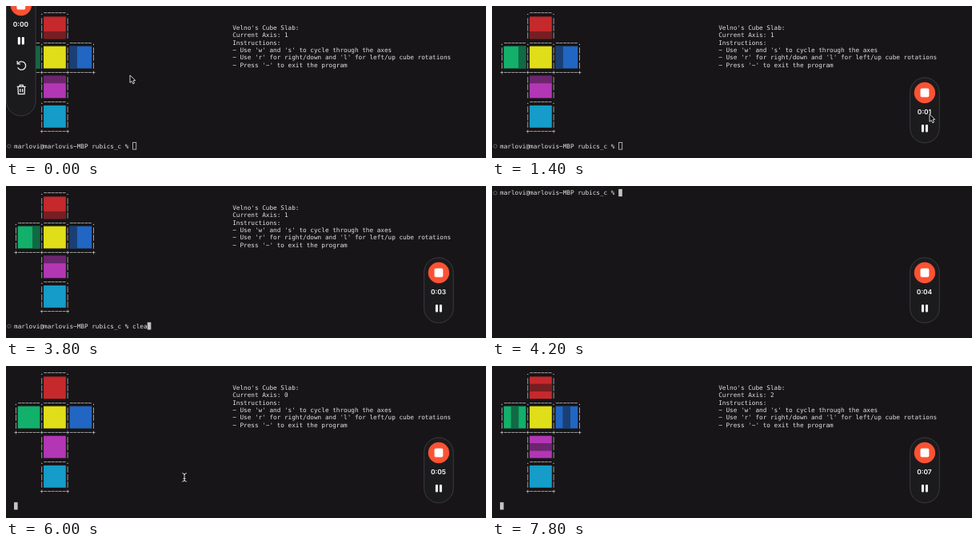
Recreate the animation shown at these times as an HTML page with a canvas. Size 600 px wide and 191 px high, loop 8 s.

```html
<!DOCTYPE html>
<html lang="en">
<head>
<meta charset="utf-8">
<title>Cube slab terminal</title>
<style>
  html, body { margin: 0; width: 100%; height: 100%; overflow: hidden; background: #171518; }
  canvas { display: block; width: 600px; height: 191px; }
</style>
</head>
<body>
<canvas id="stage"></canvas>
<script>
const W = 600, H = 191, LOOP = 8000, STEP = 200;
const CELL = 4.63, ROW = 9.3, LEFT = 10, TOP = 4.05;
const BG = '#171518', INK = '#e2e2e2';
const PROMPT = 'marlovi@marlovis-MBP rubics_c % ';

const canvas = document.getElementById('stage');
const ctx = canvas.getContext('2d');
const dpr = window.devicePixelRatio || 1;
canvas.width = W * dpr;
canvas.height = H * dpr;
ctx.scale(dpr, dpr);

const colX = c => LEFT + c * CELL;
const rowY = r => TOP + r * ROW;

// Piecewise-linear path through [time, x, y] points
function along(path, t) {
  if (t <= path[0][0]) return path[0].slice(1);
  for (let i = 1; i < path.length; i++) {
    const [t0, x0, y0] = path[i - 1], [t1, x1, y1] = path[i];
    if (t <= t1) {
      const k = (t - t0) / (t1 - t0);
      return [x0 + (x1 - x0) * k, y0 + (y1 - y0) * k];
    }
  }
  return path[path.length - 1].slice(1);
}

function print(text, col, row) {
  ctx.font = '7.69px "DejaVu Sans Mono", monospace';
  ctx.textRendering = 'geometricPrecision';
  ctx.textAlign = 'left';
  ctx.textBaseline = 'alphabetic';
  ctx.fillStyle = INK;
  // the terminal font has wide hyphens
  ctx.fillText(text.replace(/-/g, '\u2212'), colX(col), rowY(row) + 7.4);
}

function block(col, row, filled) {
  if (filled) {
    ctx.fillStyle = '#c4c4c4';
    ctx.fillRect(colX(col), rowY(row) - 0.2, CELL, ROW);
  } else {
    ctx.strokeStyle = '#b8b8b8';
    ctx.lineWidth = 0.9;
    ctx.strokeRect(colX(col) + 0.4, rowY(row), CELL - 0.5, ROW - 0.6);
  }
}

function prompt(row, typed, focused) {
  ctx.strokeStyle = '#6c6c6e';
  ctx.lineWidth = 0.8;
  ctx.beginPath();
  ctx.arc(4, rowY(row) + 4.7, 2.2, 0, 7);
  ctx.stroke();
  print(PROMPT + typed, 0, row);
  block(PROMPT.length + typed.length, row, focused);
}

// Fill cells with a colour; shaded cells get a half-tone texture
function cells(col, row, w, h, color, shaded) {
  const x = colX(col), y = rowY(row), pw = w * CELL, ph = h * ROW;
  ctx.fillStyle = BG;
  ctx.fillRect(x, y, pw, ph);
  ctx.fillStyle = color;
  ctx.globalAlpha = shaded ? 0.5 : 1;
  ctx.fillRect(x, y, pw, ph);
  if (shaded) {
    ctx.globalAlpha = 0.22;
    for (let j = 0; j < ph - 0.5; j++)
      for (let i = j % 2; i < pw - 0.5; i += 2) ctx.fillRect(x + i, y + j, 1, 1);
  }
  ctx.globalAlpha = 1;
}

function face(col, row, color, shadeRow, shadeCol) {
  cells(col, row, 6, 3, color, false);
  if (shadeRow >= 0) cells(col, row + shadeRow, 6, 1, color, true);
  if (shadeCol >= 0) cells(col + 2 * shadeCol, row, 2, 3, color, true);
}

function cube(axis) {
  const near = axis ? axis - 1 : -1, far = axis ? 3 - axis : -1;
  face(8, 1, '#c6292c', far, -1);
  face(1, 5, '#12b06a', -1, far);
  face(8, 5, '#dfde18', -1, -1);
  face(15, 5, '#2166c2', -1, near);
  face(8, 9, '#b336b4', near, -1);
  face(8, 13, '#159cc8', -1, -1);

  const edge = (c, n) => c + ('------' + c).repeat(n);
  const wall = n => '|' + '      |'.repeat(n);
  print(edge('.', 1), 7, 0);
  print(edge('.', 3), 0, 4);
  print(edge('+', 3), 0, 8);
  print(edge('.', 1), 7, 12);
  print(edge('+', 1), 7, 16);
  for (let i = 0; i < 3; i++) {
    print(wall(3), 0, 5 + i);
    for (const r of [1, 9, 13]) print(wall(1), 7, r + i);
  }

  [
    "Velno's Cube Slab:",
    'Current Axis: ' + axis,
    'Instructions:',
    "- Use 'w' and 's' to cycle through the axes",
    "- Use 'r' for right/down and 'l' for left/up cube rotations",
    "- Press '~' to exit the program"
  ].forEach((line, i) => print(line, 59, 2 + i));
}

function rounded(x, y, w, h, r) {
  ctx.beginPath();
  ctx.roundRect(x, y, w, h, r);
}

function restartIcon(x, y) {
  ctx.beginPath();
  ctx.arc(x, y, 5.2, -2.6, 2.7);
  ctx.stroke();
  ctx.beginPath();
  ctx.moveTo(x - 5.3, y - 6);
  ctx.lineTo(x - 5.1, y - 2.2);
  ctx.lineTo(x - 1.4, y - 2.2);
  ctx.stroke();
}

function trashIcon(x, y) {
  ctx.beginPath();
  ctx.moveTo(x - 5.5, y - 3.6);
  ctx.lineTo(x + 5.5, y - 3.6);
  ctx.moveTo(x - 2, y - 3.8);
  ctx.lineTo(x - 2, y - 5.6);
  ctx.lineTo(x + 2, y - 5.6);
  ctx.lineTo(x + 2, y - 3.8);
  ctx.moveTo(x - 4.2, y - 3.4);
  ctx.lineTo(x - 3.8, y + 5.6);
  ctx.lineTo(x + 3.8, y + 5.6);
  ctx.lineTo(x + 4.2, y - 3.4);
  for (const dx of [-1.4, 1.4]) {
    ctx.moveTo(x + dx, y - 1);
    ctx.lineTo(x + dx, y + 3.2);
  }
  ctx.stroke();
}

// Recorder panel; x is its centre, y its top
function recorder(x, y, height, seconds) {
  rounded(x - 18.3, y, 36.6, height, 18.3);
  ctx.fillStyle = '#1b1b1e';
  ctx.fill();
  ctx.strokeStyle = '#454548';
  ctx.lineWidth = 0.8;
  ctx.stroke();

  ctx.fillStyle = '#fb5233';
  ctx.beginPath();
  ctx.arc(x, y + 19, 13.2, 0, 7);
  ctx.fill();
  ctx.fillStyle = '#fff';
  rounded(x - 5.4, y + 13.6, 10.8, 10.8, 1.6);
  ctx.fill();

  ctx.font = '600 8.4px Inter, sans-serif';
  ctx.textAlign = 'center';
  ctx.textBaseline = 'alphabetic';
  ctx.fillText('0:0' + seconds, x - 0.4, y + 46.1);

  for (const dx of [-4, 1]) {
    rounded(x + dx, y + 59, 3, 9.4, 1);
    ctx.fill();
  }
  if (height > 120) {
    ctx.strokeStyle = '#ececec';
    ctx.lineWidth = 1.3;
    restartIcon(x + 0.6, y + 95);
    trashIcon(x + 0.4, y + 125);
  }
}

function arrow(x, y) {
  const pts = [[0, 0], [0, 9.4], [2.2, 7.4], [3.8, 10.8], [5.5, 10], [4, 6.8], [6.8, 6.6]];
  ctx.beginPath();
  pts.forEach(([dx, dy]) => ctx.lineTo(x + dx, y + dy));
  ctx.closePath();
  ctx.fillStyle = '#080808';
  ctx.fill();
  ctx.strokeStyle = '#e8e8e8';
  ctx.lineWidth = 0.9;
  ctx.stroke();
}

function ibeam(x, y) {
  ctx.beginPath();
  for (const s of [-1, 1]) {
    ctx.moveTo(x - 2.8, y + s * 5.2);
    ctx.quadraticCurveTo(x, y + s * 5.2, x, y + s * 3.4);
    ctx.quadraticCurveTo(x, y + s * 5.2, x + 2.8, y + s * 5.2);
  }
  ctx.moveTo(x, y - 4);
  ctx.lineTo(x, y + 4);
  ctx.moveTo(x - 1.5, y + 1.4);
  ctx.lineTo(x + 1.5, y + 1.4);
  ctx.strokeStyle = '#080808';
  ctx.lineWidth = 2.2;
  ctx.stroke();
  ctx.strokeStyle = '#e4e4e4';
  ctx.lineWidth = 1;
  ctx.stroke();
}

const panelPath = [[600, 18.8, -20], [800, 18, -20], [1000, 270, 42], [1200, 520, 97], [1400, 540.9, 90]];
const arrowPath = [[0, 155, 87], [200, 148, 82], [400, 92, 56], [600, 32, 30], [800, 24, 26],
  [1000, 276, 88], [1200, 526, 143], [1400, 547, 136], [1600, 547, 138]];
const beamPath = [[1800, 470, 150], [2000, 360, 158], [2200, 296, 160]];
const latePath = [[5600, 240, 128], [6000, 223, 140]];

function terminal(t) {
  if (t < 4200) {
    cube(1);
    const count = Math.max(0, Math.floor((t - 3000) / STEP));
    prompt(18, 'clear'.slice(0, count), t >= 2200);
  } else if (t < 5400) {
    const count = Math.max(0, Math.floor((t - 4200) / STEP) * 1.5);
    prompt(0, './test'.slice(0, Math.ceil(count)), true);
  } else {
    cube(t < 6600 ? 0 : t < 7400 ? 1 : 2);
    block(0, 18, true);
  }
}

function pointer(t) {
  if (t < 1800) arrow(...along(arrowPath, t));
  else if (t < 3200) ibeam(...along(beamPath, t));
  else if (t >= 5600 && t < 6600) ibeam(...along(latePath, t));
}

function draw(time) {
  const t = Math.floor((time % LOOP) / STEP) * STEP;
  ctx.fillStyle = BG;
  ctx.fillRect(0, 0, W, H);
  terminal(t);
  const [x, y] = along(panelPath, t);
  recorder(x, y, t < 600 ? 158 : 82, Math.max(0, Math.floor((t - 200) / 1000)));
  pointer(t);
}

const start = performance.now();
function tick() {
  draw(performance.now() - start);
  requestAnimationFrame(tick);
}
tick();
</script>
</body>
</html>
```
